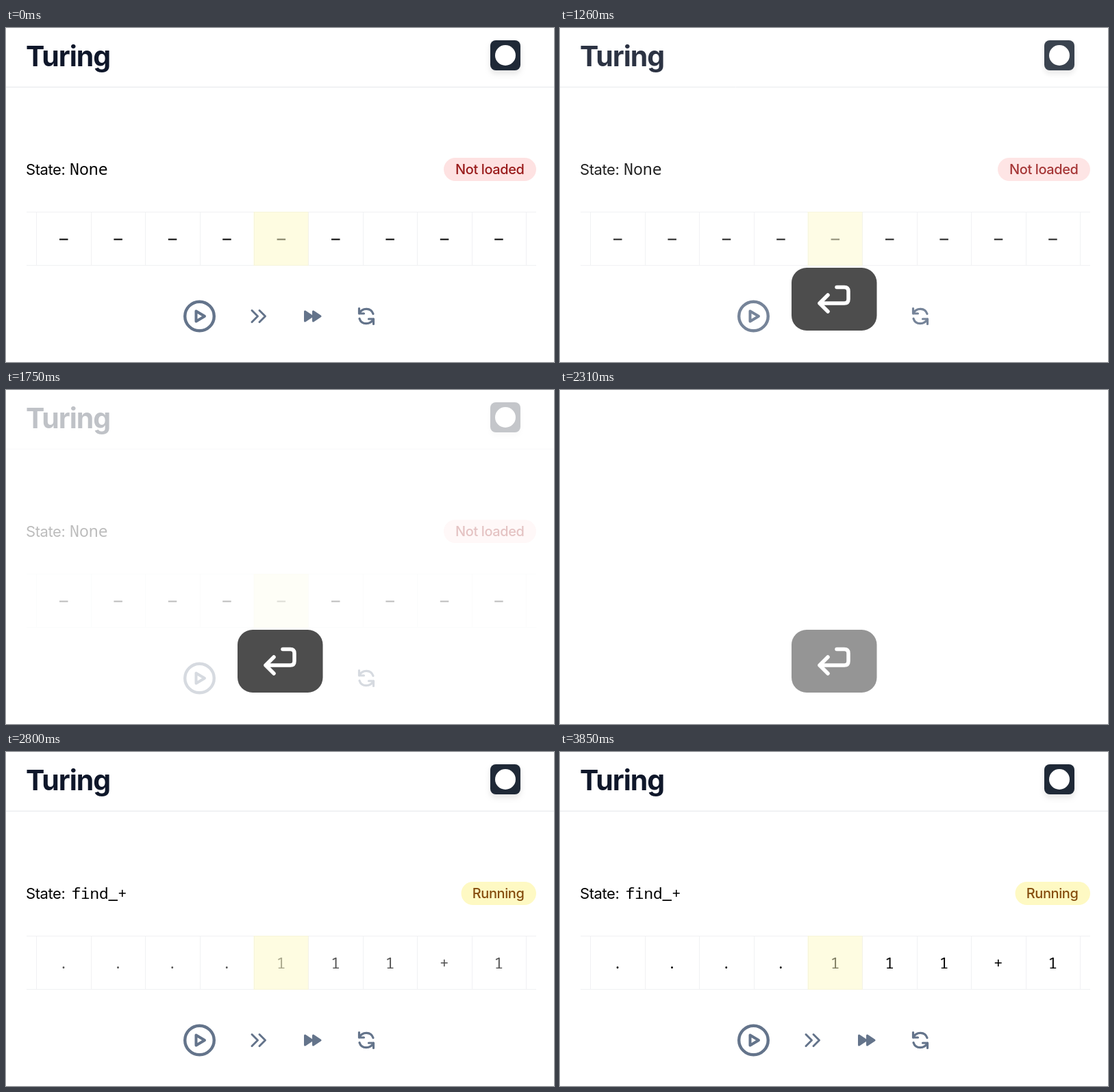
Write an HTML page that moves like this. It is 800 by 489 pixels and loops after 3.92 s.

```html
<!DOCTYPE html>
<html lang="en">
<head>
<meta charset="utf-8">
<title>Turing</title>
<style>
  html, body { margin: 0; width: 100%; height: 100%; overflow: hidden; background: #fff; }
  svg { display: block; width: 100%; height: 100%; }
  text { font-family: Inter, sans-serif; letter-spacing: -.02em; }
  .mono { font-family: "Noto Sans Mono", monospace; font-size: 22.5px; letter-spacing: 0; }
  .tape text { text-anchor: middle; }
  .pill text { font-size: 20px; font-weight: 500; text-anchor: end; }
  .line { fill: none; stroke-linecap: round; stroke-linejoin: round; }
  .button { filter: drop-shadow(0 5px 4px rgba(0, 0, 0, .1)); }
</style>
</head>
<body>
<svg viewBox="0 0 800 489">
  <defs>
    <path id="halfCycle" d="M-10.5 -11.5V-4H-3.5M-10.5 -4C-6 -13 7 -13 10 -3.5"/>
  </defs>

  <g id="page">
    <text x="29" y="56" font-size="41" font-weight="700" fill="#0f172a" style="letter-spacing:-.025em">Turing</text>
    <rect class="button" x="707" y="18" width="44" height="44" rx="8" fill="#1f2937"/>
    <circle cx="729" cy="40" r="15" fill="#fff"/>
    <path d="M0 86.5H800" stroke="#e5e7eb"/>

    <text x="29" y="215" font-size="22">State:</text>
    <g id="before">
      <text class="mono" x="93" y="215" style="font-size:23.2px">None</text>
      <g class="pill">
        <rect x="639" y="190" width="135" height="34" rx="17" fill="#fee2e2"/>
        <text x="756.5" y="214" fill="#991b1b">Not loaded</text>
      </g>
    </g>
    <g id="after">
      <text class="mono" x="95.5" y="215">find_+</text>
      <g class="pill">
        <rect x="664.5" y="190" width="109.5" height="34" rx="17" fill="#fef9c3"/>
        <text x="756.5" y="214" fill="#854d0e">Running</text>
      </g>
    </g>

    <path id="grid" fill="none" stroke="#f0f1f3"/>
    <g class="tape">
      <path id="blanks" stroke="#000" stroke-width="2"/>
      <g id="symbols"></g>
    </g>
    <rect x="361.5" y="269" width="80" height="79" fill="#fef9c3" opacity=".5"/>

    <g class="line" stroke="#64748b">
      <circle cx="282.5" cy="422" r="21.3" stroke-width="4.4"/>
      <path d="M277.5 414.5V429.5L290 422Z" stroke-width="4"/>
      <path d="M359 413.5L367.5 422L359 430.5M370 413.5L378.5 422L370 430.5" stroke-width="3"/>
      <path d="M436.5 415V429L447 422ZM448.5 415V429L459 422Z" stroke-width="3" fill="#64748b"/>
      <g transform="translate(526 422)" stroke-width="3.2">
        <use href="#halfCycle"/>
        <use href="#halfCycle" transform="rotate(180)"/>
      </g>
    </g>
  </g>

  <g id="key">
    <rect x="338" y="351" width="124.5" height="92" rx="22" fill="#4d4d4d"/>
    <path class="line" stroke="#fff" stroke-width="5.5"
      d="M404 379.5H415Q421 379.5 421 385.5V397Q421 403 415 403H379M391 391L379 403L391 415"/>
  </g>
</svg>
<script>
  const LOOP = 3920, STEP = 70, SWAP = 2330;
  const CELL = 79.4, TAPE_LEFT = 44.3, MIDDLE = TAPE_LEFT + CELL / 2;
  const el = id => document.getElementById(id);
  const show = (id, opacity) => el(id).setAttribute("opacity", opacity);
  const ramp = (t, from, to) => Math.min(1, Math.max(0, (t - from) / (to - from)));

  let grid = "M30 269.5H774M30 347.5H774", blanks = "";
  for (let i = 0; i < 10; i++) grid += `M${Math.round(TAPE_LEFT + i * CELL) + .5} 270V347`;
  [..."....111+1"].forEach((symbol, i) => {
    const x = MIDDLE + i * CELL;
    blanks += `M${x - 6} 309.5h12.5`;
    el("symbols").innerHTML += `<text class="mono" x="${x}" y="317">${symbol}</text>`;
  });
  el("grid").setAttribute("d", grid);
  el("blanks").setAttribute("d", blanks);

  function draw(now) {
    const t = Math.floor(now % LOOP / STEP) * STEP;
    const fadeOut = (1 - ramp(t, 1190, 2340)) ** 2;
    const loaded = t >= SWAP;
    show("page", loaded ? ramp(t, SWAP, 2790) : fadeOut);
    show("before", loaded ? 0 : 1);
    show("after", loaded ? 1 : 0);
    show("blanks", 1 - ramp(t, 2520, 2640));
    show("symbols", ramp(t, 2590, 2905));
    show("key", ramp(t, 770, 980) * (1 - ramp(t, 2200, 2470)));
    requestAnimationFrame(draw);
  }
  requestAnimationFrame(draw);
</script>
</body>
</html>
```
